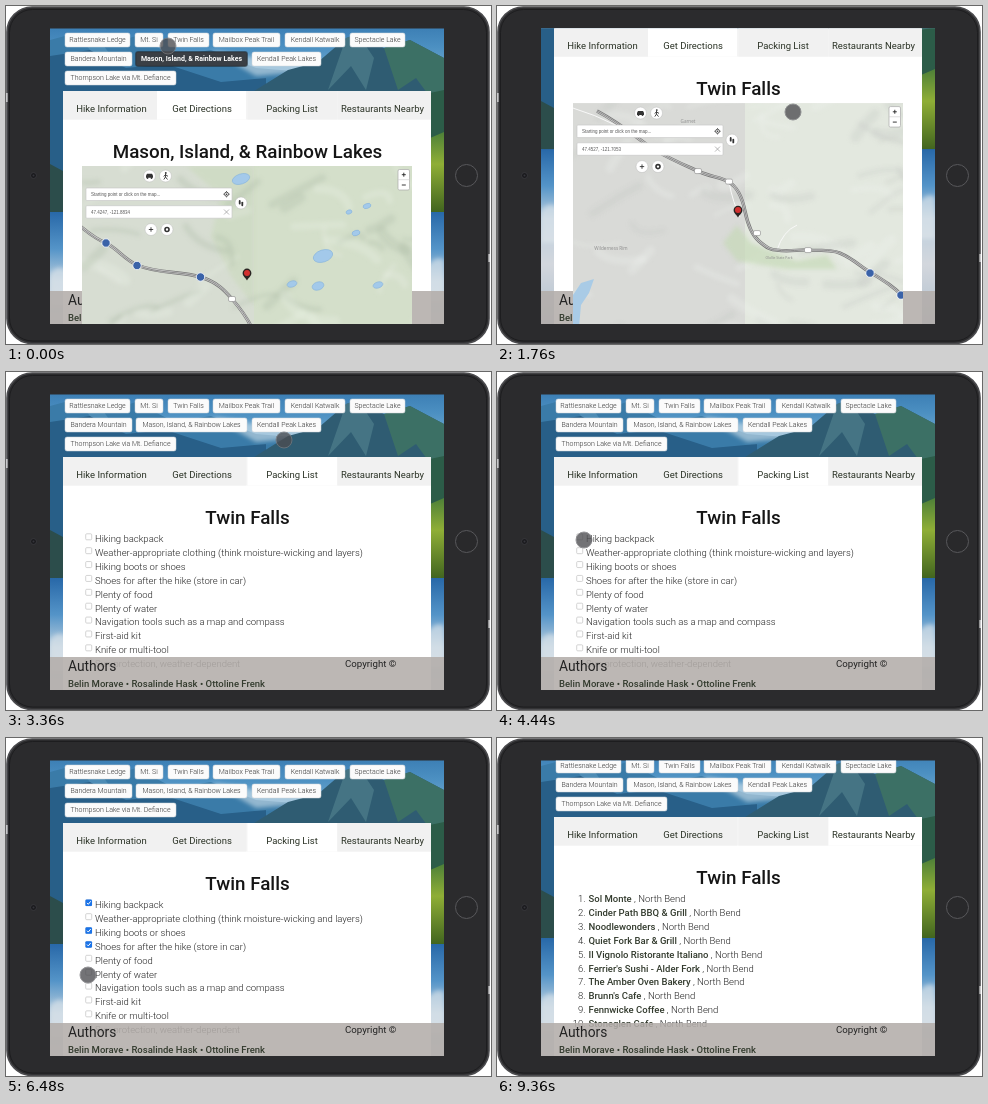
Write an HTML page that moves like this. It is 485x338 px and loops after 9.76 s.

```html
<!DOCTYPE html>
<html lang="en">
<head>
<meta charset="utf-8">
<title>Hike planner on a tablet</title>
<style>
  html, body { margin: 0; width: 100%; height: 100%; overflow: hidden; background: #fff; }
  svg { display: block; width: 485px; height: 338px; font-family: Roboto, "Open Sans", sans-serif; }
  text { white-space: pre; }
  .btn { font-size: 7px; font-weight: 300; fill: #333; text-anchor: middle; }
  .btn.on { font-weight: 600; fill: #fff; }
  .tab { font-size: 9.5px; fill: #2b3326; text-anchor: middle; }
  .title { font-size: 18.8px; font-weight: 500; fill: #151515; text-anchor: middle; }
  .row { font-size: 9.5px; font-weight: 300; fill: #222; }
  .strong { font-weight: 500; fill: #333b2e; }
  .field { font: 4.5px "Liberation Sans", Arial, sans-serif; fill: #555; }
  .place { font: 4.6px "Noto Sans", sans-serif; fill: #8f8f8f; text-anchor: middle; }
</style>
</head>
<body>
<svg id="stage" viewBox="0 0 485 338" xmlns="http://www.w3.org/2000/svg"></svg>
<script>
const LOOP = 9760, STEP = 40;

const buttons = [
  ["Rattlesnake Ledge", 59, 65, 27], ["Mt. Si", 129, 28, 27], ["Twin Falls", 162, 41, 27],
  ["Mailbox Peak Trail", 207, 67, 27], ["Kendall Katwalk", 279, 60, 27], ["Spectacle Lake", 344, 55, 27],
  ["Bandera Mountain", 59, 67, 46], ["Mason, Island, & Rainbow Lakes", 130, 111, 46],
  ["Kendall Peak Lakes", 246, 69, 46], ["Thompson Lake via Mt. Defiance", 59, 111, 65]
];
const tabs = [
  ["Hike Information", 57, 151, 105.5], ["Get Directions", 151, 240, 196],
  ["Packing List", 241.5, 331, 286], ["Restaurants Nearby", 331.5, 425, 376.5]
];
const packing = [
  "Hiking backpack", "Weather-appropriate clothing (think moisture-wicking and layers)",
  "Hiking boots or shoes", "Shoes for after the hike (store in car)", "Plenty of food", "Plenty of water",
  "Navigation tools such as a map and compass", "First-aid kit", "Knife or multi-tool",
  "Sun protection, weather-dependent"
];
const restaurants = [
  "Sol Monte", "Cinder Path BBQ & Grill", "Noodlewonders", "Quiet Fork Bar & Grill",
  "Il Vignolo Ristorante Italiano", "Ferrier's Sushi - Alder Fork", "The Amber Oven Bakery",
  "Brunn's Cafe", "Fennwicke Coffee", "Stoneglen Cafe"
];
const checkTimes = { 0: 4640, 2: 5280, 3: 5920, 5: 6640 };

const esc = s => s.replace(/&/g, "&amp;");
const rect = (x, y, w, h, fill, more = "") =>
  `<rect x="${x}" y="${y}" width="${w}" height="${h}" fill="${fill}" ${more}/>`;
const dot = (x, y, r, fill, more = "") => `<circle cx="${x}" cy="${y}" r="${r}" fill="${fill}" ${more}/>`;
const shape = (d, fill, more = "") => `<path d="${d}" fill="${fill}" ${more}/>`;
const line = (d, color, width, more = "") =>
  `<path d="${d}" fill="none" stroke="${color}" stroke-width="${width}" ${more}/>`;
const text = (cls, x, y, s, more = "") => `<text class="${cls}" x="${x}" y="${y}" ${more}>${esc(s)}</text>`;
const gradient = (id, ...stops) => `<linearGradient id="${id}" x2="0" y2="1">` +
  stops.map(([at, c]) => `<stop offset="${at}" stop-color="${c}"/>`).join("") + "</linearGradient>";

function random(seed) {
  return () => (seed = (seed * 16807) % 2147483647) / 2147483647;
}

function landscape() {
  return rect(44, 0, 394, 206, "url(#sky)") +
    shape("M44 34L70 27L98 40L130 30L168 50L205 44L250 62L300 66V206H44Z", "#3a7ba8") +
    shape("M44 50L84 44L120 62L160 58L215 76L260 72V206H44Z", "#285f88") +
    shape("M70 27L98 40L112 60L84 44Z", "#5c98bf", 'opacity=".6"') +
    shape("M205 44L250 52L300 50L320 64L250 70Z", "#cfe0ea", 'opacity=".6" filter="url(#soft)"') +
    shape("M240 90L282 64L312 56L340 32L352 28L378 42L404 34L438 52V206H240Z", "#2f5c72") +
    shape("M340 32L352 28L368 52L360 84L345 60L322 84Z", "#4f7f8c", 'opacity=".7"') +
    shape("M378 42L404 34L438 52V110L410 72L392 84Z", "#3c7065") +
    shape("M400 92L438 84V206H400Z", "#2c5c48") +
    shape("M400 142Q420 134 438 126V206H400Z", "url(#meadow)") +
    shape("M44 158L70 172V206H44Z", "#2c4d4b") +
    rect(44, 206, 394, 230, "url(#clouds)") +
    shape("M44 268Q52 256 62 266V300H44ZM420 262Q430 248 438 254V296H420Z", "#e2e8ec", 'opacity=".6" filter="url(#soft)"');
}

function footer() {
  return rect(44, 285, 394, 33, "#b3adaa", 'opacity=".88"') +
    text("row", 62, 298.5, "Authors", 'style="font-size:13.8px;font-weight:400"') +
    text("row", 339, 295, "Copyright ©", 'style="font-size:9.7px;font-weight:400"') +
    text("row strong", 62, 314.5, "Belin Morave • Rosalinde Hask • Ottoline Frenk");
}

function tablet() {
  return rect(1, 1, 482, 336.5, "#2b2b2d", 'rx="25" stroke="#4b4b4e" stroke-width="1.6"') +
    rect(3.5, 3.5, 477, 331.5, "none", 'rx="23" stroke="#1d1d1f"') +
    rect(0, 87, 1.6, 9, "#c9c9cb") + rect(482.4, 248, 1.6, 8, "#c9c9cb") +
    dot(27.5, 169.5, 3, "#1b1b1e", 'stroke="#3c3c40" stroke-width=".8"') + dot(27.5, 169.5, 1, "#35353c") +
    dot(460.5, 169.5, 11, "#29292b", 'stroke="#58585b" stroke-width="1"');
}

function terrain(seed, dark, light) {
  const rnd = random(seed);
  let out = "";
  for (let i = 0; i < 70; i++) {
    const x = 70 + rnd() * 340, y = 155 + rnd() * 260;
    const dx = 12 + rnd() * 38, dy = (rnd() - 0.5) * 56;
    const bend = (rnd() - 0.5) * 26;
    out += line(`M${x} ${y}q${dx / 2 + bend} ${dy / 2 - bend} ${dx} ${dy}`,
      i % 2 ? dark : light, 3 + rnd() * 8, 'opacity=".28" stroke-linecap="round"');
  }
  return `<g filter="url(#soft)">${out}</g>`;
}

const road = d => line(d, "#777", 3.4) + line(d, "#cfcfcf", 2) + line(d, "#6d6d6d", 0.7);
const shield = (x, y) => dot(x, y, 4.2, "#3a62a8", 'stroke="#fff" stroke-width=".8"');
const routeTag = (x, y) => rect(x - 3.5, y - 2.5, 7, 5, "#fff", 'rx="1.5" stroke="#888" stroke-width=".6"');
const lake = (x, y, rx, ry) => `<ellipse cx="${x}" cy="${y}" rx="${rx}" ry="${ry}" fill="#a3c9ea"
  stroke="#86b3dc" stroke-width=".6" transform="rotate(-18 ${x} ${y})"/>`;

function masonMap() {
  return rect(76, 160, 172, 250, "#d7ddd2") + rect(248, 160, 158, 250, "#d4dfca") +
    shape("M180 160H248V300L225 270L205 230L215 190Z", "#cbdabd", 'opacity=".6" filter="url(#soft)"') +
    terrain(41, "#a9b8a2", "#eef2e8") +
    lake(235, 173, 9, 5) + lake(317, 250, 10, 6) + lake(286, 278, 5, 3) + lake(312, 280, 6, 4) +
    lake(350, 227, 4, 2.6) + lake(372, 279, 5, 3) + lake(361, 200, 4, 2.4) + lake(343, 206, 3, 2) +
    road("M74 220C86 230 92 234 100 237C112 243 119 254 131 259C152 268 175 265 194 271C212 276 220 286 226 293C234 302 240 310 246 322") +
    shield(100, 237) + shield(131, 259.5) + shield(194.5, 271) + routeTag(226, 293);
}

function fallsMap() {
  return rect(76, 160, 172, 250, "#d9dad7") + rect(248, 160, 158, 250, "#e3e8df") +
    terrain(97, "#c3c6c0", "#f1f3ef") +
    shape("M226 300L240 282L254 300L300 318L330 312L340 326L290 326L240 318Z", "#c5d9b6", 'opacity=".65" filter="url(#soft)"') +
    shape("M76 352L84 340L97 336L92 350L84 362L82 384H76Z", "#a9cbe6") +
    line("M76 165Q120 178 160 208M232 239Q236 260 243 274M280 307Q286 288 300 282", "#f8f8f8", 1) +
    road("M100 168C130 184 145 200 160 208C175 217 190 223 201 228C214 234 224 234 232 239C242 245 246 258 248 268C251 283 255 292 262 298C270 305 274 307 280 307C292 309 303 306 315 307C326 307 336 307 343 310C357 316 364 324 373 329C386 337 396 343 408 355") +
    routeTag(201, 228) + routeTag(232, 238.5) + routeTag(260, 290) + routeTag(311, 307) +
    text("place", 114, 307, "Wilderness Rim") + text("place", 191, 180, "Garnet") +
    text("place", 282, 316, "Olallie State Park", 'style="font-size:3.4px"') +
    shield(373, 330) + shield(404, 352);
}

function mapPanel(art, coords) {
  const knob = (x, y) => dot(x, y, 6, "#fff", 'stroke="#bbb" stroke-width=".5"');
  const field = (y, s) => rect(80, y, 146, 12.5, "#fff", 'rx="1" stroke="#c4c4c4" stroke-width=".6"') +
    text("field", 85, y + 7.8, s);
  const ink = "#333";
  return `<g clip-path="url(#mapArea)">${art}` +
    knob(143.5, 170) + shape("M140 171.8V169.6L141 167.8H146L147 169.6V171.8Z", ink) +
    dot(141.5, 172, 0.9, ink) + dot(145.5, 172, 0.9, ink) +
    knob(159.5, 170) + dot(159.8, 167, 0.9, ink) +
    line("M159.5 168V171L157.8 173.5M159.5 171L161.5 173.5M159.5 168.8L162 170.3M159.5 168.8L157.6 170.4", ink, 0.9) +
    field(182, "Starting point or click on the map...") + field(199.7, coords) +
    dot(220.5, 188.2, 2, "none", `stroke="${ink}" stroke-width=".8"`) + dot(220.5, 188.2, 0.8, ink) +
    line("M220.5 185V186M220.5 190.4V191.4M217.3 188.2H218.3M222.7 188.2H223.7", ink, 0.7) +
    line("M218 203.5L223 208.5M223 203.5L218 208.5", "#999", 0.7) +
    knob(235, 197) + rect(232.8, 194, 1.8, 4.5, ink, 'rx=".9"') + rect(235.4, 195.7, 1.8, 4.5, ink, 'rx=".9"') +
    knob(145, 223.5) + line("M142.8 223.5H147.2M145 221.3V225.7", ink, 0.9) +
    knob(161, 223.5) + dot(161, 223.5, 2, "none", `stroke="${ink}" stroke-width="1.6"`) +
    rect(392, 163.5, 11.5, 20.5, "#fff", 'rx="1.5" stroke="#aaa" stroke-width=".7"') +
    line("M392 173.7H403.5", "#ccc", 0.6) +
    line("M395.8 168.7H399.8M397.8 166.7V170.7M395.8 179H399.8", "#222", 0.9) +
    shape("M241 274.5C239.5 271.5 236.6 270.5 236.6 267A4.4 4.4 0 0 1 245.4 267C245.4 270.5 242.5 271.5 241 274.5Z", "#2b2422") +
    dot(241, 267, 3, "#d2302f") + "</g>";
}

const rowY = i => 170.2 + i * 13.88;

function packingList() {
  return packing.map((s, i) => {
    const y = rowY(i) - 8.4;
    return rect(79.7, y, 6, 6, "#fff", 'rx="1" stroke="#c2c2c2" stroke-width=".7"') +
      `<g class="check" data-row="${i}">` + rect(79.4, y - 0.3, 6.6, 6.6, "#1a73e8", 'rx="1.2"') +
      line(`M81 ${y + 3.1}l1.3 1.4l2.4-3`, "#fff", 1) + "</g>" + text("row", 89, rowY(i), s);
  }).join("");
}

function restaurantList() {
  return restaurants.map((s, i) => text("row", 88.5, rowY(i), i + 1 + ".", 'text-anchor="end"') +
    `<text class="row" x="91.5" y="${rowY(i)}"><tspan class="strong">${esc(s)}</tspan> , North Bend</text>`
  ).join("");
}

function page(title, tab, picked, body) {
  const pills = buttons.map(([s, x, w, y]) => {
    const on = s === picked;
    return (on ? rect(x - 1, y - 1, w + 2, 16, "#1d2a35", 'rx="3" opacity=".5"') : "") +
      rect(x, y, w, 14, on ? "#3a3f45" : "#fbfbfb", `rx="2" stroke="${on ? "#2a2e33" : "#d0d4d8"}" stroke-width=".5"`) +
      text(on ? "btn on" : "btn", x + w / 2, y + 9.4, s);
  }).join("");
  const heads = tabs.map(([s, a, b, mid], i) =>
    rect(a, 85, b - a, 28.5, i === tab ? "#fff" : "#f1f1f1") + text("tab", mid, 106, s)).join("");
  return '<use href="#landscape"/>' + pills + rect(57, 85, 368, 340, "#fff", 'rx="2"') +
    rect(57, 85, 368, 28.5, "#f4f4f4") + heads + text("title", 241.5, 151.5, title) + body;
}

function scene(id, title, tab, picked, body, panel = "") {
  return `<g id="${id}"><g class="scroll">${page(title, tab, picked, body)}</g><use href="#footer"/>` +
    `<g class="scroll">${panel}</g>` +
    dot(0, 0, 8, "#4c4c50", 'class="cursor" opacity=".78" stroke="#77777b" stroke-width="1"') + "</g>";
}

const stage = document.getElementById("stage");
stage.innerHTML = "<defs>" +
  gradient("sky", [0, "#2b6ca6"], [0.2, "#4c90c2"], [0.5, "#a9cfe4"]) +
  gradient("meadow", [0, "#4e8038"], [0.4, "#8fae36"], [1, "#42651f"]) +
  gradient("clouds", [0, "#2868a8"], [0.16, "#5494c8"], [0.3, "#b9cddd"], [0.5, "#d3d7dd"], [1, "#8fa9c0"]) +
  '<filter id="soft"><feGaussianBlur stdDeviation="2"/></filter>' +
  '<clipPath id="screen"><rect x="44" y="22.5" width="394" height="295.5"/></clipPath>' +
  '<clipPath id="mapArea"><rect x="76" y="160" width="330" height="250"/></clipPath>' +
  `<g id="landscape">${landscape()}</g><g id="footer">${footer()}</g></defs>` +
  tablet() + '<g clip-path="url(#screen)">' +
  scene("mason", "Mason, Island, & Rainbow Lakes", 1, "Mason, Island, & Rainbow Lakes", "",
    mapPanel(masonMap(), "47.4247, -121.8834")) +
  scene("falls", "Twin Falls", 1, "Twin Falls", "", mapPanel(fallsMap(), "47.4527, -121.7053")) +
  scene("packing", "Twin Falls", 2, "", packingList()) +
  scene("food", "Twin Falls", 3, "", restaurantList()) + "</g>";

const clamp = v => Math.max(0, Math.min(1, v));
const smooth = p => p * p * (3 - 2 * p);

// Cursor stops: time, x, y
const fallsPath = [[560, 162, 40], [1160, 296, 106]];
const packingPath = [
  [3280, 296, 104], [3360, 278, 68], [4240, 87, 168], [4680, 87, 168], [5120, 83, 195], [5360, 83, 195],
  [5760, 83, 208], [6000, 83, 208], [6400, 82, 237], [6840, 82, 237], [8080, 376, 104]
];

function along(path, t) {
  let i = 0;
  while (i < path.length - 2 && t > path[i + 1][0]) i++;
  const [t0, x0, y0] = path[i], [t1, x1, y1] = path[i + 1];
  const p = smooth(clamp((t - t0) / (t1 - t0)));
  return [x0 + (x1 - x0) * p, y0 + (y1 - y0) * p];
}

const parts = ["mason", "falls", "packing", "food"].map(id => {
  const el = document.getElementById(id);
  return { el, scrolls: el.querySelectorAll(".scroll"), cursor: el.querySelector(".cursor") };
});
const checks = document.querySelectorAll(".check");

function pose(part, alpha, scroll, at) {
  part.el.setAttribute("opacity", alpha);
  part.el.style.display = alpha > 0 ? "" : "none";
  part.scrolls.forEach(g => g.setAttribute("transform", `translate(0 ${-scroll})`));
  part.cursor.style.display = at ? "" : "none";
  if (at) part.cursor.setAttribute("transform", `translate(${at[0]} ${at[1]})`);
}

function draw(t) {
  const fade = start => clamp((t - start) / 400);
  const left = 1 - clamp((t - 1440) / 720);
  const nudge = clamp((t - 9160) / 200);
  pose(parts[0], t < 400 ? 1 : 0, 0, [162, 40]);
  pose(parts[1], t < 3120 ? fade(0) : 0, 91 * (1 - left * left), along(fallsPath, t));
  pose(parts[2], t < 8640 ? fade(2720) : 0, 0, along(packingPath, t));
  pose(parts[3], fade(8240), 6 * nudge * nudge, null);
  checks.forEach(c => {
    c.style.display = t >= checkTimes[c.dataset.row] ? "" : "none";
  });
}

function tick() {
  draw(Math.floor((performance.now() % LOOP) / STEP) * STEP);
  requestAnimationFrame(tick);
}
tick();
</script>
</body>
</html>
```
